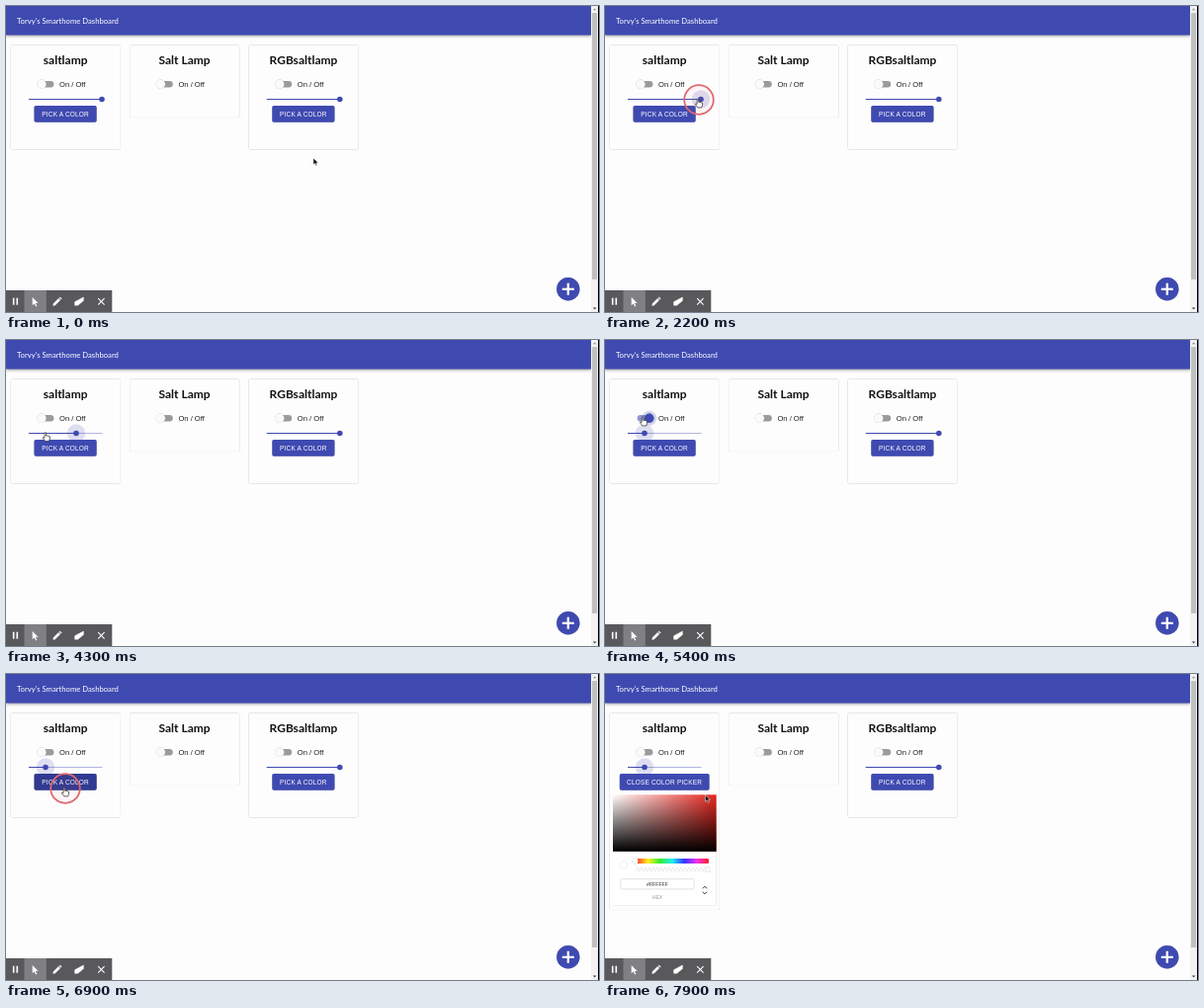
Recreate the animation shown at these times as an HTML page. Size 600 by 310 pixels, loop 8000 ms.

```html
<!DOCTYPE html>
<html lang="en">
<head>
<meta charset="utf-8">
<style>
html, body { margin: 0; width: 100%; height: 100%; overflow: hidden; background: #fefdfe; }
svg { display: block; width: 600px; height: 310px; }
text { font-family: "Liberation Sans", Arial, sans-serif; }
.title { font: bold 12px Lato, sans-serif; text-anchor: middle; fill: #111; }
.bar { font: 7.7px Lato, sans-serif; fill: #fff; }
.label { font-size: 7.6px; fill: #222; }
.btn { font-size: 6.5px; letter-spacing: .17px; text-anchor: middle; fill: #fff; }
.card { fill: #fefdfe; stroke: rgba(0,0,0,.05); stroke-width: .6; filter: drop-shadow(0 .9px .4px rgba(0,0,0,.24)); }
.raised { filter: drop-shadow(0 .8px .7px rgba(0,0,0,.3)); }
.knob { fill: #fafafa; filter: drop-shadow(0 .5px .7px rgba(0,0,0,.35)); }
.small { text-anchor: middle; font-size: 5.2px; fill: #333; }
</style>
</head>
<body>
<svg id="stage" viewBox="0 0 600 310"></svg>
<script>
const INDIGO = '#3f4ab1', DARK = '#303a92', LOOP = 8000;

const toggle = id => `
  <rect id="${id}Track" x="32.6" y="76" width="15.8" height="6.4" rx="3.2" fill="#9c9a9c"/>
  <circle id="${id}Halo" cy="79.2" r="7.5" fill="${INDIGO}" opacity="0"/>
  <circle id="${id}Knob" class="knob" cx="36" cy="79.2" r="4.7"/>
  <text class="label" x="54" y="81.5">On / Off</text>`;

const slider = id => `
  <rect x="23" y="94" width="74.5" height="1" fill="${INDIGO}" opacity=".4"/>
  <rect id="${id}Fill" x="23" y="94" width="74" height="1" fill="${INDIGO}"/>
  <circle id="${id}Ring" cx="97" cy="94.5" r="9.2" fill="${INDIGO}" opacity="0"/>
  <circle id="${id}Thumb" cx="97" cy="94.5" r="2.8" fill="${INDIGO}"/>`;

const button = id => `
  <rect id="${id}Box" class="raised" x="28.5" y="101" width="63.2" height="16.8" rx="1.8" fill="${INDIGO}"/>
  <text id="${id}Text" class="btn" x="60.1" y="111.7">PICK A COLOR</text>`;

const card = (id, x, name, full) => `
  <g transform="translate(${x})">
    <rect id="${id}Card" class="card" x="4.7" y="39.5" width="111.2" height="${full ? 106 : 73.5}" rx="1.8"/>
    <text class="title" x="60.2" y="58.6">${name}</text>
    ${toggle(id)}${full ? slider(id) + button(id) : ''}
  </g>`;

const stops = colors => colors.map((c, i) =>
  `<stop offset="${i / (colors.length - 1)}" stop-color="${c}"/>`).join('');

const picker = `
  <g id="picker">
    <rect class="raised" x="8" y="122.3" width="104.6" height="112.5" rx="1" fill="#fff"/>
    <rect x="8" y="122.3" width="104.6" height="57.5" fill="url(#sat)"/>
    <rect x="8" y="122.3" width="104.6" height="57.5" fill="url(#val)"/>
    <circle cx="19" cy="193.5" r="3.7" fill="#fff" stroke="#e9e9e9" stroke-width=".7"/>
    <rect x="31" y="187" width="74" height="5" rx="1" fill="url(#hue)"/>
    <rect x="31" y="195.7" width="74" height="4.6" rx="1" fill="url(#check)"/>
    <circle class="knob" cx="30.5" cy="189.6" r="3"/>
    <circle class="knob" cx="104" cy="198" r="3"/>
    <rect x="15.8" y="207.7" width="74.4" height="10.2" rx="1" fill="#fff" stroke="#d6d6d6" stroke-width=".7"/>
    <text class="small" x="53" y="214.6">#FFFFFF</text>
    <text class="small" x="53" y="228" style="fill:#999">HEX</text>
    <path d="M98.9 217.3l2.1-2.1 2.1 2.1M98.9 220.7l2.1 2.1 2.1-2.1" fill="none" stroke="#333"/>
  </g>`;

const toolbar = `
  <rect y="288" width="107.3" height="22" fill="#59585b"/>
  <rect x="18.5" y="288" width="22.3" height="22" fill="#807f82"/>
  <g fill="#fff" stroke="#fff">
    <path d="M7.7 295.8v7M11.3 295.8v7" stroke-width="1.6"/>
    <path d="M26.7 295v8.3l2-1.9 1.5 3.1 1.2-.6-1.5-3h2.7z" stroke="none"/>
    <path d="M47.6 303.5l.4-2 5.2-5.2 1.7 1.7-5.2 5.2zM53.9 295.6l.8-.7 1.7 1.7-.8.7z" stroke-width=".3"/>
    <path d="M69.6 299.8l8.8-4.7v3.5l-5.6 4.6h-3.2z" stroke-width=".5"/>
    <path d="M93.2 296.2l6.4 6.4M99.6 296.2l-6.4 6.4" stroke-width="1.1"/>
  </g>`;

stage.innerHTML = `
  <defs>
    <linearGradient id="sat">${stops(['#fff', '#e8251d'])}</linearGradient>
    <linearGradient id="val" x2="0" y2="1"><stop stop-opacity="0"/><stop offset="1"/></linearGradient>
    <linearGradient id="hue">${stops(['#f22', '#fe2', '#3e3', '#2ee', '#33f', '#e3e', '#f22'])}</linearGradient>
    <pattern id="check" width="4" height="4" patternUnits="userSpaceOnUse">
      <rect width="4" height="4" fill="#fff"/><path d="M0 0h2v4h2v-2h-4z" fill="#ececec"/>
    </pattern>
  </defs>
  <rect width="600" height="310" fill="#fefdfe"/>
  <rect width="592" height="29.5" fill="${INDIGO}" style="filter:drop-shadow(0 1px 1.5px rgba(0,0,0,.38))"/>
  <text class="bar" x="11" y="17.6">Torvy's Smarthome Dashboard</text>
  <rect x="592" width="8" height="310" fill="#f3f2f3"/>
  <rect x="593" y="7" width="5" height="270" fill="#c1c0c1"/>
  <path d="M593.8 4.2l1.8-2 1.8 2z" fill="#999"/>
  <path d="M593.8 305.5l1.8 2 1.8-2z" fill="#444"/>
  <rect x="599" width="1" height="310"/>
  ${card('a', 0, 'saltlamp', true)}
  ${card('b', 120.4, 'Salt Lamp', false)}
  ${card('c', 240.8, 'RGBsaltlamp', true)}
  ${picker}
  <circle cx="568.8" cy="286.8" r="11.7" fill="${INDIGO}" class="raised"/>
  <path d="M562.8 286.8h12M568.8 280.8v12" stroke="#fff" stroke-width="2.3"/>
  ${toolbar}
  <circle id="press" r="14.8" fill="#e05060" fill-opacity=".05" stroke="#dc6a70" stroke-width="1.8"/>
  <g id="cursor">
    <path id="arrow" d="M0 0v6.8l1.6-1.4 1.2 2.4 1.1-.5-1.1-2.4h2.2z" fill="#111" stroke="#fff" stroke-width=".5"/>
    <path id="hand" d="M-.8 .3q.8-.9 1.5 0v3q2.6 0 3.9 1v2l-.9 2.6h-3.8l-2.6-3.3q0-1.2 1.9-.1z" fill="#fff" stroke="#222" stroke-width=".7"/>
  </g>`;

const el = id => document.getElementById(id);
const set = (id, attrs) => {
  for (const k in attrs) el(id).setAttribute(k, attrs[k]);
};
const show = (id, on) => set(id, { visibility: on ? 'visible' : 'hidden' });

// Linear value between [time, value] keys
function at(t, keys) {
  const i = keys.findIndex(k => k[0] > t);
  if (i < 0) return keys[keys.length - 1][1];
  if (i === 0) return keys[0][1];
  const [t0, v0] = keys[i - 1], [t1, v1] = keys[i];
  return v0 + (v1 - v0) * (t - t0) / (t1 - t0);
}

const path = [
  [0, 311, 154], [900, 140, 125], [1500, 84, 113], [1900, 84, 106], [2100, 94, 94],
  [2800, 94, 94], [3600, 71, 94], [4200, 40, 94], [4700, 39, 92], [5100, 38, 78],
  [5800, 38, 78], [6300, 48, 101.5], [6700, 59, 115], [7400, 59, 115], [7600, 76, 134],
  [7900, 101.5, 122.5]
];
const pathX = path.map(p => [p[0], p[1]]), pathY = path.map(p => [p[0], p[2]]);
const switchOn = [[5200, 0], [5400, 1], [5800, 1], [6000, 0]];
const presses = [[2100, 4200], [5100, 5300], [5700, 5900], [6900, 7100]];
const DRAG_LAG = 700, HOVER_LAG = 200, OPEN = 7100;

function overButton(t) {
  const x = at(t, pathX), y = at(t, pathY);
  return Math.abs(x - 60) < 32 && y > 101 && y < 118;
}

// The thumb trails the dragging cursor
function thumbAt(t) {
  const dragTime = Math.min(Math.max(t - DRAG_LAG, 2800), 4200);
  return Math.max(39, at(dragTime, pathX) + (dragTime < 3600 ? 1.5 : 0));
}

function draw(t) {
  const x = at(t, pathX), y = at(t, pathY);
  const isHand = t >= 1500 && t < 7500;
  set('cursor', { transform: `translate(${x} ${y})` });
  show('hand', isHand);
  show('arrow', !isHand);
  set('press', { cx: x + 1, cy: y + 1 });
  show('press', presses.some(([from, to]) => t >= from && t < to));

  const thumb = Math.min(97, thumbAt(t) + (t < 2800 + DRAG_LAG ? 1.5 : 0));
  set('aFill', { width: thumb - 23 });
  set('aThumb', { cx: thumb });
  set('aRing', { cx: thumb, opacity: at(t, [[2000, 0], [2200, .17]]) });

  const on = at(t, switchOn), knob = 36 + 8.8 * on;
  set('aTrack', { fill: on > .5 ? '#9096ce' : '#9c9a9c' });
  set('aHalo', { cx: knob, opacity: .22 * on });
  set('aKnob', { cx: knob, style: `fill:${on > .5 ? INDIGO : '#fafafa'}` });

  const open = t >= OPEN;
  show('picker', open);
  set('aCard', { height: open ? 199.5 : 106 });
  set('aBox', {
    x: open ? 14.8 : 28.5,
    width: open ? 90.8 : 63.2,
    fill: overButton(t - HOVER_LAG) ? DARK : INDIGO
  });
  el('aText').textContent = open ? 'CLOSE COLOR PICKER' : 'PICK A COLOR';
}

const start = performance.now();
function tick() {
  const t = (performance.now() - start) % LOOP;
  draw(Math.floor(t / 100) * 100);
  requestAnimationFrame(tick);
}
tick();
</script>
</body>
</html>
```
